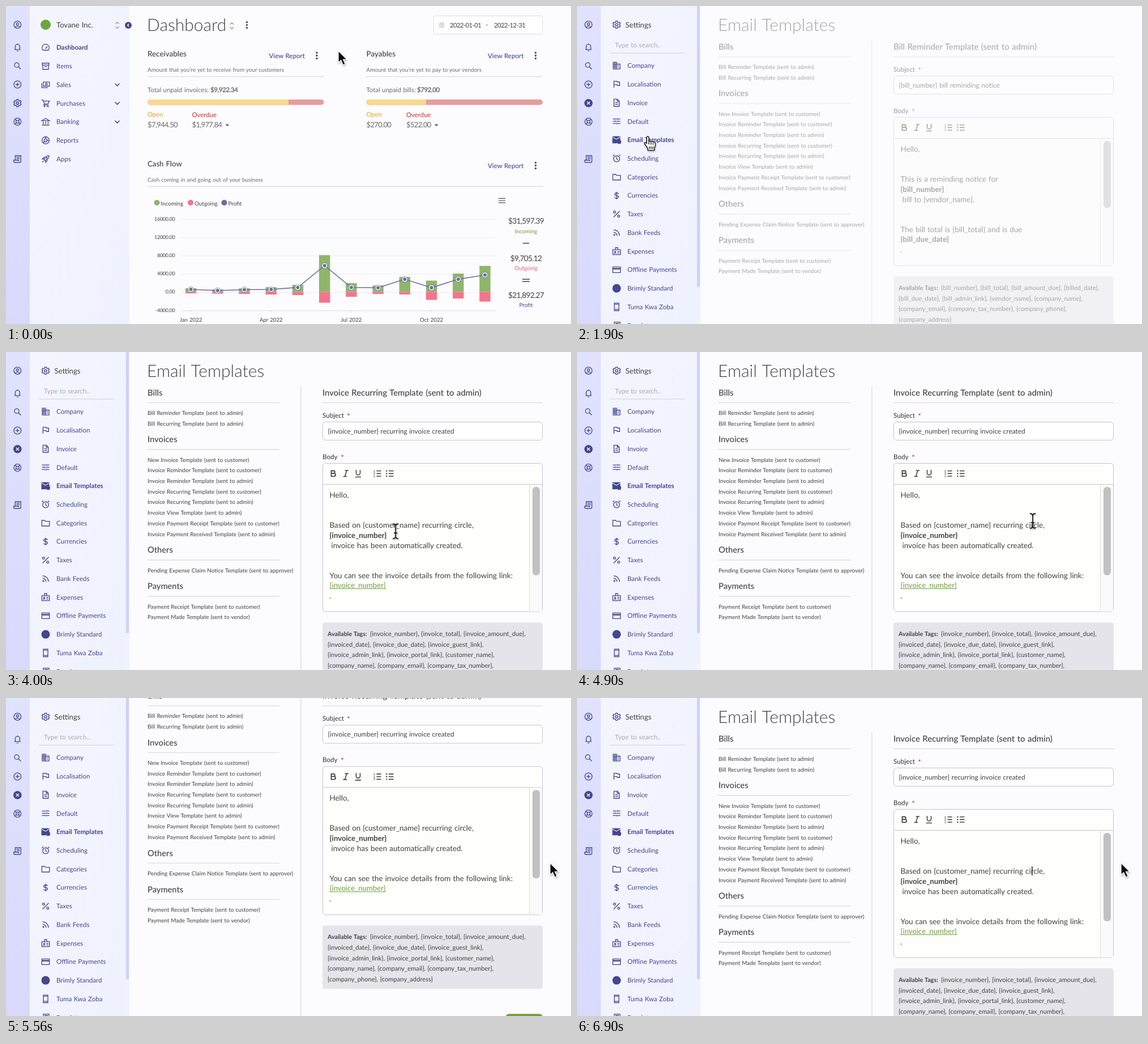
These frames come from a looping animation (998x561 px, 7 s). An HTML page:

```html
<!DOCTYPE html>
<html lang="en">
<head>
<meta charset="utf-8">
<title>Email templates</title>
<style>
html, body { margin: 0; width: 100%; height: 100%; overflow: hidden; background: #fcfbfe; }
svg { display: block; width: 100vw; height: 100vh; }
text { font-family: Lato, sans-serif; word-spacing: .05em; text-rendering: geometricPrecision; }
</style>
</head>
<body>
<svg id="stage" viewBox="0 0 998 561">
  <defs>
    <linearGradient id="rail" x1="0" y1="0" x2="0" y2="1">
      <stop offset="0" stop-color="#e0e2fe"/><stop offset="1" stop-color="#d9d9fc"/>
    </linearGradient>
    <linearGradient id="panel" x1="0" y1="0" x2="1" y2="1">
      <stop offset="0" stop-color="#f4f5fe"/><stop offset="1" stop-color="#eef2fe"/>
    </linearGradient>
    <filter id="shadow" x="-50%" y="-50%" width="200%" height="200%">
      <feDropShadow dx=".5" dy="1.5" stdDeviation="1.4" flood-opacity=".35"/>
    </filter>
  </defs>
</svg>
<script>
const LOOP = 7000;
const INK = '#45468f', DARK = '#424242', GREY = '#6b6b6b', RULE = '#dedee5';
const GREEN = '#8fb56a', PINK = '#f3758d', VIOLET = '#6a6ca3';
const stage = document.getElementById('stage');

// Drawing helpers
function add(parent, tag, attrs) {
  const node = document.createElementNS('http://www.w3.org/2000/svg', tag);
  for (const key in attrs) node.setAttribute(key, attrs[key]);
  return parent.appendChild(node);
}
const group = (parent, attrs = {}) => add(parent, 'g', attrs);
const box = (g, x, y, width, height, fill, rx = 0, more = {}) =>
  add(g, 'rect', { x, y, width, height, fill, rx, ...more });
const dot = (g, cx, cy, r, fill) => add(g, 'circle', { cx, cy, r, fill });
const stroke = (g, d, color = INK, width = 1.4, more = {}) =>
  add(g, 'path', { d, fill: 'none', stroke: color, 'stroke-width': width, ...more });
const rule = (g, x1, x2, y) => stroke(g, `M${x1} ${y}H${x2}`, RULE, 1.3);

function text(g, x, mid, str, size, fill = DARK, weight = 400, more = {}) {
  const node = add(g, 'text', { x, y: mid + size * .355, fill, 'font-size': size, 'font-weight': weight, ...more });
  node.textContent = str;
  return node;
}
const figures = (g, x, mid, str, size, fill, weight, more) =>
  text(g, x, mid, str, size, fill, weight, { 'letter-spacing': '-.05em', ...more });
const centered = { 'text-anchor': 'middle' };
const show = (node, on) => node.setAttribute('visibility', on ? 'visible' : 'hidden');

// Icons on a 24 unit grid
const ring = (x, y, r) => `M${x - r} ${y}a${r} ${r} 0 1 0 ${2 * r} 0a${r} ${r} 0 1 0 ${-2 * r} 0`;
const ICONS = {
  user: ring(12, 12, 9.5) + ring(12, 10, 3) + 'M6 18.5q6-5 12 0',
  bell: 'M6 17v-7a6 6 0 0 1 12 0v7M4 17.8h16M10 21.5h4M12 2v2',
  search: ring(10, 10, 6) + 'M14.5 14.5L21 21',
  plus: ring(12, 12, 9.5) + 'M12 7v10M7 12h10',
  gear: 'M10 3h4l.6 2.7 2 1.1 2.6-.9 2 3.4-2 1.9v1.6l2 1.9-2 3.4-2.6-.9-2 1.1L14 21h-4l-.6-2.7-2-1.1-2.6.9-2-3.4 2-1.9v-1.6l-2-1.9 2-3.4 2.6.9 2-1.1z' + ring(12, 12, 3),
  buoy: ring(12, 12, 9.5) + ring(12, 12, 4) + 'M5.4 5.4l3.7 3.7M14.9 14.9l3.7 3.7M18.6 5.4l-3.7 3.7M9.1 14.9l-3.7 3.7',
  receipt: 'M6 15V3h15v15a3 3 0 0 1-3 3H5a3 3 0 0 1-3-3v-3h13v3M9 7h9M9 11h9',
  speed: 'M5 19a9.5 9.5 0 1 1 14 0zM11.5 15l5-6',
  archive: 'M3 4h18v5H3zM4.500 9v11.500h15V9M9 13h6',
  cash: 'M6 5h16v11H6zM2 8v12h16' + ring(14, 10.5, 2.5),
  cart: 'M1 3h4l4 11h9l4-8H6.500M9 14l-2 3h13' + ring(9, 20.5, 1) + ring(18, 20.5, 1),
  bank: 'M2 9l10-6 10 6zM5.500 11v7M12 11v7M18.500 11v7M2 20.500h20',
  pie: ring(12, 12, 9.5) + ring(12, 12, 4) + 'M12 2.500v5.500M16 12h5.500M9 15l-3.500 4',
  rocket: 'M8 14q3-11 13-11 0 10-11 13zM8 13l-5-1 4-4 4 .5M11 16l1 5 4-4-.5-4M3 21l4-4' + ring(15, 9, 1.2),
  company: 'M3 3h9v18H3zM12 8h9v13h-9M3 8h9M3 12h9M3 16h9M7.500 3v18M15 12h3M15 16h3',
  flag: 'M5 21V4h8l1 2.500h6v9h-6L13 13H5',
  page: 'M5 2.500h9l5 5v14H5zM8 12h8M8 16.500h8M13.500 3v5h5',
  tune: 'M2 6h11M17 6h5M15 3.500v5M2 12h4M10 12h12M8 9.500v5M2 18h9M15 18h7M13 15.500v5',
  mail: 'M13 19H2V4h19v7M2 6l9.500 6L21 6' + ring(18, 17, 4),
  alarm: ring(12, 13, 8) + 'M12 8v5l3.500 2.500M2 6l4-4M22 6l-4-4',
  folder: 'M2 5h7l2.500 2.500H22V20H2z',
  dollar: 'M17 8q-1-3-5-3t-5 3 5 4 5 4-5 3.500-5-3M12 2v20',
  percent: ring(6.5, 6.5, 2.8) + ring(17.5, 17.5, 2.8) + 'M20 4L4 20',
  feed: ring(6, 18, 1.4) + 'M4 11a9 9 0 0 1 9 9M4 4.500a15.500 15.500 0 0 1 15.500 15.500',
  badge: 'M2 8h20v13H2zM9 8V2.500h6V8M14 13h5M14 17h5M5 18q3-3 6 0' + ring(8, 13, 1.4),
  card: 'M2 4.500h20v15H2zM2 8.500h20M2 10h20',
  phone: 'M6 2h12v20H6zM6 5h12M6 18.500h12',
  calendar: 'M4 5h16v16H4zM4 10h16M8 2v5M16 2v5M8 14h8M8 17h8'
};
function icon(g, name, x, y, color = INK, size = 16) {
  const k = size / 24;
  return stroke(g, ICONS[name], color, 2, { transform: `translate(${x - size / 2} ${y - size / 2}) scale(${k})` });
}
function disc(g, x, y, r, mark) {
  const part = group(g, { transform: `translate(${x} ${y})` });
  dot(part, 0, 0, r, INK);
  stroke(part, mark, '#fff', 1.3);
  return part;
}
const CROSS = 'M-2.500 -2.500l5 5M2.500 -2.500l-5 5';
const dots = (g, x, y) => [-5, 0, 5].forEach(d => dot(g, x, y + d, 1.7, INK));
const upDown = (g, x, y) => stroke(g, `M${x - 3} ${y - 2.5}l3-3 3 3M${x - 3} ${y + 2.5}l3 3 3-3`, '#8485b0', 1.1);

// Dashboard
function dueCard(g, x, title, note, label, total, totalX, split, open, overdue, overdueX) {
  text(g, x, 84.5, title, 13.4, DARK, 500);
  text(g, x + 214.5, 87.5, 'View Report', 11.5, INK, 500);
  dots(g, x + 299, 87.5);
  text(g, x, 112, note, 9.9, GREY);
  rule(g, x, x + 311.5, 124.5);
  text(g, x, 148, label, 11.4, GREY);
  figures(g, totalX, 148, total, 11.8, GREY, 700);
  box(g, x, 165, 311.5, 9.5, '#e99b9b', 4.7);
  add(g, 'path', { d: `M${split} 165H${x + 4.7}a4.700 4.700 0 0 0 0 9.500H${split}z`, fill: '#f8d98e' });
  text(g, x, 191.5, 'Open', 11.2, '#eda11c');
  text(g, overdueX, 191.5, 'Overdue', 11.4, '#c72f2f');
  figures(g, x, 209.5, open, 13, GREY);
  const end = overdueX + figures(g, overdueX, 209.5, overdue, 13, GREY).getComputedTextLength();
  add(g, 'path', { d: `M${end + 6} 208.500h7l-3.500 4z`, fill: GREY });
}

function chart(g) {
  ['Incoming', 'Outgoing', 'Profit'].forEach((name, i) => {
    const x = 266.5 + i * 59.5;
    dot(g, x, 347, 5, [GREEN, PINK, VIOLET][i]);
    text(g, x + 7, 348.5, name, 9.9);
  });
  stroke(g, 'M870 339.500h12M870 343.300h12M870 347h12', '#666', 1.3);
  for (let i = 0; i < 6; i++) {
    const y = 376.5 + i * 32.2;
    stroke(g, `M310 ${y}H865`, i < 5 ? '#ececf0' : '#dcdce2', 1);
    figures(g, 298.5, y - 1, (16000 - i * 4000) + '.00', 9, DARK, 400, { 'text-anchor': 'end', 'letter-spacing': '-.03em' });
  }
  const tops = [498, 500, 498, 496, 492, 439.5, 489, 493, 478, 484.5, 472, 458.5];
  const ends = [507, 507.5, 508, 509, 510, 523.5, 513, 508, 509, 518.5, 516, 521.5];
  const line = [500, 502, 500.5, 500, 496.5, 458, 496.5, 497, 482, 497, 482, 474.5];
  const at = i => 326.6 + i * 47.22;
  tops.forEach((y, i) => {
    box(g, at(i) - 9.7, y, 19.4, 504.5 - y, GREEN);
    box(g, at(i) - 9.7, 504.5, 19.4, ends[i] - 504.5, PINK);
  });
  stroke(g, 'M' + line.map((y, i) => at(i) + ' ' + y).join('L'), VIOLET, 1.6);
  line.forEach((y, i) => [[5.2, VIOLET], [4.5, '#fff'], [3, VIOLET]].forEach(([r, c]) => dot(g, at(i), y, r, c)));
  ['Jan', 'Apr', 'Jul', 'Oct'].forEach((month, i) => {
    stroke(g, `M${at(i * 3)} 537.500v4`, '#dcdce2', 1);
    text(g, at(i * 3), 554, month + ' 2022', 9.7, DARK, 400, centered);
  });
}

function dashboard(g) {
  text(g, 249, 33.5, 'Dashboard', 30, DARK, 300);
  upDown(g, 399, 35);
  dots(g, 425.5, 33.5);
  box(g, 755.5, 17.5, 192, 32, '#fff', 2, { stroke: '#dddde0' });
  icon(g, 'calendar', 769.5, 33.5, '#b9b9be', 11);
  figures(g, 784, 33.5, '2022-01-01', 11.3);
  text(g, 847.5, 33.5, '-', 11);
  figures(g, 862, 33.5, '2022-12-31', 11.3);
  dueCard(g, 250, 'Receivables', 'Amount that you\u2019re yet to receive from your customers',
    'Total unpaid invoices:', '$9,922.34', 361, 499, '$7,944.50', '$1,977.84', 328.5);
  dueCard(g, 636.5, 'Payables', 'Amount that you\u2019re yet to pay to your vendors',
    'Total unpaid bills:', '$792.00', 726, 742, '$270.00', '$522.00', 707);
  text(g, 250, 278.5, 'Cash Flow', 13.2, DARK, 500);
  text(g, 851, 281.5, 'View Report', 11.5, INK, 500);
  dots(g, 935.5, 281.5);
  text(g, 250, 306, 'Cash coming in and going out of your business', 9.9, GREY);
  rule(g, 250, 948, 318.5);
  chart(g);
  [['$31,597.39', 'Incoming', '#6fa03f'], ['$9,705.12', 'Outgoing', '#ef5f78'], ['$21,892.27', 'Profit', INK]].forEach(([sum, name, color], i) => {
    figures(g, 918.5, 379.5 + i * 65.3, sum, 13.7, DARK, 400, centered);
    text(g, 918.5, 397 + i * 65.2, name, 10, color, 400, centered);
  });
  stroke(g, 'M913 418.500h11M912 482h13M912 486h13', DARK, 1.5);
}

// Email templates page
const LISTS = [
  ['Bills', 71.5, ['Bill Reminder Template (sent to admin)', 'Bill Recurring Template (sent to admin)']],
  ['Invoices', 154, ['New Invoice Template (sent to customer)', 'Invoice Reminder Template (sent to customer)',
    'Invoice Reminder Template (sent to admin)', 'Invoice Recurring Template (sent to customer)',
    'Invoice Recurring Template (sent to admin)', 'Invoice View Template (sent to admin)',
    'Invoice Payment Receipt Template (sent to customer)', 'Invoice Payment Received Template (sent to admin)']],
  ['Others', 349, ['Pending Expense Claim Notice Template (sent to approver)']],
  ['Payments', 413, ['Payment Receipt Template (sent to customer)', 'Payment Made Template (sent to vendor)']]
];
const links = [];
function lists(g) {
  for (const [title, y, names] of LISTS) {
    text(g, 250, y, title, 14.7, DARK, 500);
    rule(g, 250, 483, y + 18);
    names.forEach((name, i) => {
      const mid = y + 36 + i * 18.72;
      const label = text(g, 250, mid, name, 9.95);
      const width = label.getComputedTextLength();
      links.push({ label, mid, right: 250 + width, line: stroke(g, `M250 ${mid + 6.5}h${width}`, INK, 1) });
    });
  }
}

function formFrame(g) {
  rule(g, 559, 948, 89.5);
  [['Subject', 111.5, 602.5], ['Body', 184.5, 591.5]].forEach(([name, y, star]) => {
    text(g, 559, y, name, 11.6, DARK, 500);
    text(g, star, y + 1, '*', 11.5, '#e02424', 700);
  });
  const edge = { stroke: '#c5c5cb' };
  box(g, 559.5, 123.5, 388, 32, '#fff', 5, edge);
  box(g, 559.5, 196.5, 388, 261.5, '#fefefd', 5, edge);
  stroke(g, 'M560 233.500H947', '#c5c5cb', 1);
  box(g, 924.5, 234, 22.5, 223.5, '#fafafa');
  stroke(g, 'M924.500 234V457.500', '#dcdcdc', 1);
  const tools = '#444';
  stroke(g, 'M574.500 209.500h4a2.300 2.300 0 0 1 0 4.600h-4zM574.500 214.100h5a2.600 2.600 0 0 1 0 5.200h-5z', tools, 1.8);
  stroke(g, 'M598.500 209h6.500M595.500 219.500h6.500M602 209l-3.500 10.500', tools, 1.6);
  stroke(g, 'M618.500 208v5.500a3.500 3.500 0 0 0 7 0V208M617 220.500h10', tools, 1.6);
  for (let i = 0; i < 3; i++) {
    const y = 209.8 + i * 4.6;
    stroke(g, `M654.500 ${y}h8M676 ${y}h8.500`, tools, 1.6);
    text(g, 649, y, i + 1, 5, tools, 700);
    dot(g, 672.3, y, 1.2, tools);
  }
  box(g, 559, 477, 389, 112, '#e5e4eb', 5);
  text(g, 568, 497, 'Available Tags:', 10.7, DARK, 700);
  text(g, 838, 647, 'Cancel', 13, DARK, 400, centered);
  box(g, 882.5, 633, 65.5, 28, '#70a03b', 6);
  text(g, 915, 647, 'Save', 13, '#fff', 500, centered);
}

function template(g, title, weight, subject, lines, tags, thumb) {
  text(g, 559, 71.5, title, 14.9, DARK, weight);
  text(g, 568.5, 139.5, subject, 11.9);
  const [intro, name, rest, more, last, link] = lines;
  text(g, 571.5, 252, 'Hello,', 13.4);
  text(g, 571.5, 305, intro, 13.4);
  text(g, 571.5, 323, name, 13.2, DARK, 700);
  text(g, 574.5, 341, rest, 13.4);
  text(g, 571.5, 394, more, 13.4);
  const tail = text(g, 571.5, 411, last, 13.2, link ? '#70a03b' : DARK, link ? 400 : 700);
  if (link) stroke(g, `M571.500 417.500h${tail.getComputedTextLength()}`, '#70a03b', 1);
  text(g, 571, 430, '.', 13.4);
  box(g, 930, 238, 13, thumb, '#c1c1c1', 6);
  tags.forEach((row, i) => {
    const str = row.split(' ').map(tag => `{${tag}}`).join(', ') + (i < tags.length - 1 ? ',' : '');
    text(g, i ? 568 : 643, 497 + i * 18.7, str, 11.2);
  });
}

// Side panels
const SETTINGS = [['company', 'Company'], ['flag', 'Localisation'], ['page', 'Invoice'], ['tune', 'Default'],
  ['mail', 'Email Templates'], ['alarm', 'Scheduling'], ['folder', 'Categories'], ['dollar', 'Currencies'],
  ['percent', 'Taxes'], ['feed', 'Bank Feeds'], ['badge', 'Expenses'], ['card', 'Offline Payments'],
  ['', 'Brimly Standard'], ['phone', 'Tuma Kwa Zoba'], ['receipt', 'Receipt']];
const MENU = [['speed', 'Dashboard'], ['archive', 'Items'], ['cash', 'Sales', 1], ['cart', 'Purchases', 1],
  ['bank', 'Banking', 1], ['pie', 'Reports'], ['rocket', 'Apps']];

function menuPanel(g) {
  dot(g, 70, 33, 9, '#6da53f');
  text(g, 89, 33, 'Tovane Inc.', 13.1, DARK);
  upDown(g, 196.5, 34);
  MENU.forEach(([name, label, opens], i) => {
    const y = 73.3 + i * 32.75;
    icon(g, name, 70, y);
    text(g, 89, y, label, 11.5, INK, i ? 400 : 700);
    if (opens) stroke(g, `M192.500 ${y - 2}l4 4 4-4`, INK, 1.6);
  });
  disc(g, 216, 34, 6, 'M1.200 -2.500l-2.500 2.500 2.500 2.500');
}

const mailStates = [];
function settingsPanel(g) {
  icon(g, 'gear', 70, 33, INK, 17);
  text(g, 85.5, 33, 'Settings', 13.1);
  text(g, 67, 69, 'Type to search..', 11.6, '#a9aab8');
  stroke(g, 'M58 83H190.500', '#cfd0da', 1);
  box(g, 212, 0, 5, 561, '#f1f2fb');
  box(g, 212, -4, 5, 500, '#c9d4fd', 2);
  SETTINGS.forEach(([name, label], i) => {
    const y = 105.2 + i * 32.74;
    const part = group(g);
    if (name) icon(part, name, 70, y); else dot(part, 70, y, 7.5, INK);
    text(part, 89, y, label, 11.5, INK);
    if (name !== 'mail') return;
    const active = group(g);
    add(active, 'path', { d: `M62.500 ${y - 6.5}h14v8.500h-4l-2 4h-8z`, fill: INK });
    stroke(active, `M63 ${y - 5}l6.500 4 6.500-4`, '#f1f3fe', 1.2);
    dot(active, 74.5, y + 3.5, 3.6, INK);
    text(active, 89, y, label, 11.5, INK, 700);
    mailStates.push(part, active);
  });
}

// Assemble
const home = group(stage);
const page = group(stage);
text(page, 249, 33.5, 'Email Templates', 30, DARK, 300);
stroke(page, 'M520.800 61V704', '#d9d9e3', 1.2);
lists(page);
formFrame(page);
const bill = group(page), invoice = group(page);
template(bill, 'Bill Reminder Template (sent to admin)', 400, '{bill_number} bill reminding notice',
  ['This is a reminding notice for', '{bill_number}', 'bill to {vendor_name}.', 'The bill total is {bill_total} and is due', '{bill_due_date}'],
  ['bill_number bill_total bill_amount_due billed_date', 'bill_due_date bill_admin_link vendor_name company_name',
    'company_email company_tax_number company_phone', 'company_address'], 118.5);
template(invoice, 'Invoice Recurring Template (sent to admin)', 500, '{invoice_number} recurring invoice created',
  ['Based on {customer_name} recurring circle,', '{invoice_number}', 'invoice has been automatically created.',
    'You can see the invoice details from the following link:', '{invoice_number}', true],
  ['invoice_number invoice_total invoice_amount_due', 'invoiced_date invoice_due_date invoice_guest_link',
    'invoice_admin_link invoice_portal_link customer_name', 'company_name company_email company_tax_number',
    'company_phone company_address'], 156);
const caret = box(page, 803.2, 297, 1.4, 16, '#111');
dashboard(home);

box(stage, 42, 0, 176, 561, 'url(#panel)');
box(stage, 0, 0, 42, 561, 'url(#rail)');
const menu = group(stage), settings = group(stage);
menuPanel(menu);
settingsPanel(settings);
const closeTab = disc(stage, 216, 34, 6, CROSS);
[['user', 33], ['bell', 73], ['search', 105.5], ['plus', 138.5], ['buoy', 204], ['receipt', 270]].forEach(([name, y]) => icon(stage, name, 20.3, y));
const railGear = icon(stage, 'gear', 20.3, 171.3, INK, 17);
const railClose = disc(stage, 20.3, 171.3, 7.3, CROSS);

const tip = group(stage);
box(tip, 36, 164, 58, 23, '#fff', 4, { stroke: '#e6e6ee' });
text(tip, 46, 175.5, 'Settings', 11.8);

const pointer = group(stage, { filter: 'url(#shadow)' });
const shapes = {
  arrow: add(pointer, 'path', { d: 'M0 0V21l4.700-4.200 3.700 8.400 4-1.700-3.700-8.200h6.500z', fill: '#111', stroke: '#fff', 'stroke-width': 1.3 }),
  hand: add(pointer, 'path', {
    d: 'M-1.800 1.500q1.800-3 3.600 0v8q1.700-2.500 3.700 0 2-2 3.700.7 2.500-1.700 4 1.300 1 5-1.500 8.500v4.500H0v-3.500l-6-8.500q.5-3.500 4.200 0zM2 10v4M5.700 10.500v4M9.400 11.500v3M3 18v4M6 18v4M9 18v4',
    fill: '#fff', stroke: '#222', 'stroke-width': 1.5, 'stroke-linejoin': 'round' }),
  beam: stroke(pointer, 'M-5-12q5 0 5 4 0-4 5-4M0-8V10M-5 14q5 0 5-4 0 4 5 4M-3 4h6', '#222', 1.8)
};

// Motion
const PATH = [[30, 587, 79], [460, 28, 163], [830, 28, 163], [1100, 125, 230], [2430, 125, 230], [2680, 262, 246],
  [2930, 284, 262], [3130, 284, 262], [3700, 640, 300], [3900, 640, 300], [4100, 735, 330], [4600, 735, 330],
  [4900, 805, 297], [5000, 805, 297], [5300, 961, 291]];
function ease(t, from, to) {
  const u = Math.min(1, Math.max(0, (t - from) / (to - from)));
  return u * u * (3 - 2 * u);
}
function position(t) {
  let [, x, y] = PATH[0];
  for (let i = 1; i < PATH.length; i++) {
    const [from, x0, y0] = PATH[i - 1], [to, x1, y1] = PATH[i];
    const k = ease(t, from, to);
    x += (x1 - x0) * k;
    y += (y1 - y0) * k;
  }
  return [x, y];
}
function shapeAt(x, onPage) {
  if (x < 205 || (onPage && x > 250 && x < 500)) return 'hand';
  return onPage && x > 560 && x < 925 ? 'beam' : 'arrow';
}

function render(t) {
  const onPage = t >= 1800, open = t >= 400, swapped = t >= 3450;
  const [x, y] = position(t);
  const shape = shapeAt(x, onPage);
  pointer.setAttribute('transform', `translate(${x} ${y})`);
  for (const name in shapes) show(shapes[name], name === shape);

  show(home, !onPage);
  show(page, onPage);
  page.setAttribute('opacity', ease(t, 1760, 2060));
  page.setAttribute('transform', `translate(0 ${-153 * (ease(t, 5360, 5765) - ease(t, 6260, 6500))})`);
  show(menu, !open);
  show(settings, open);
  show(closeTab, open && !onPage);
  show(railGear, !open);
  show(railClose, open);
  show(tip, t >= 360 && t < 870);
  show(mailStates[0], open && !onPage);
  show(mailStates[1], onPage);
  show(bill, onPage && !swapped);
  show(invoice, swapped);
  show(caret, t >= 5000 && Math.floor((t - 4900) / 200) % 2 === 0);
  for (const { label, mid, right, line } of links) {
    const over = onPage && x > 250 && x < right && Math.abs(y + 1 - mid) < 9.3;
    label.setAttribute('fill', over ? INK : DARK);
    show(line, over);
  }
}

const start = performance.now();
(function tick() {
  render((performance.now() - start) % LOOP);
  requestAnimationFrame(tick);
})();
</script>
</body>
</html>
```
